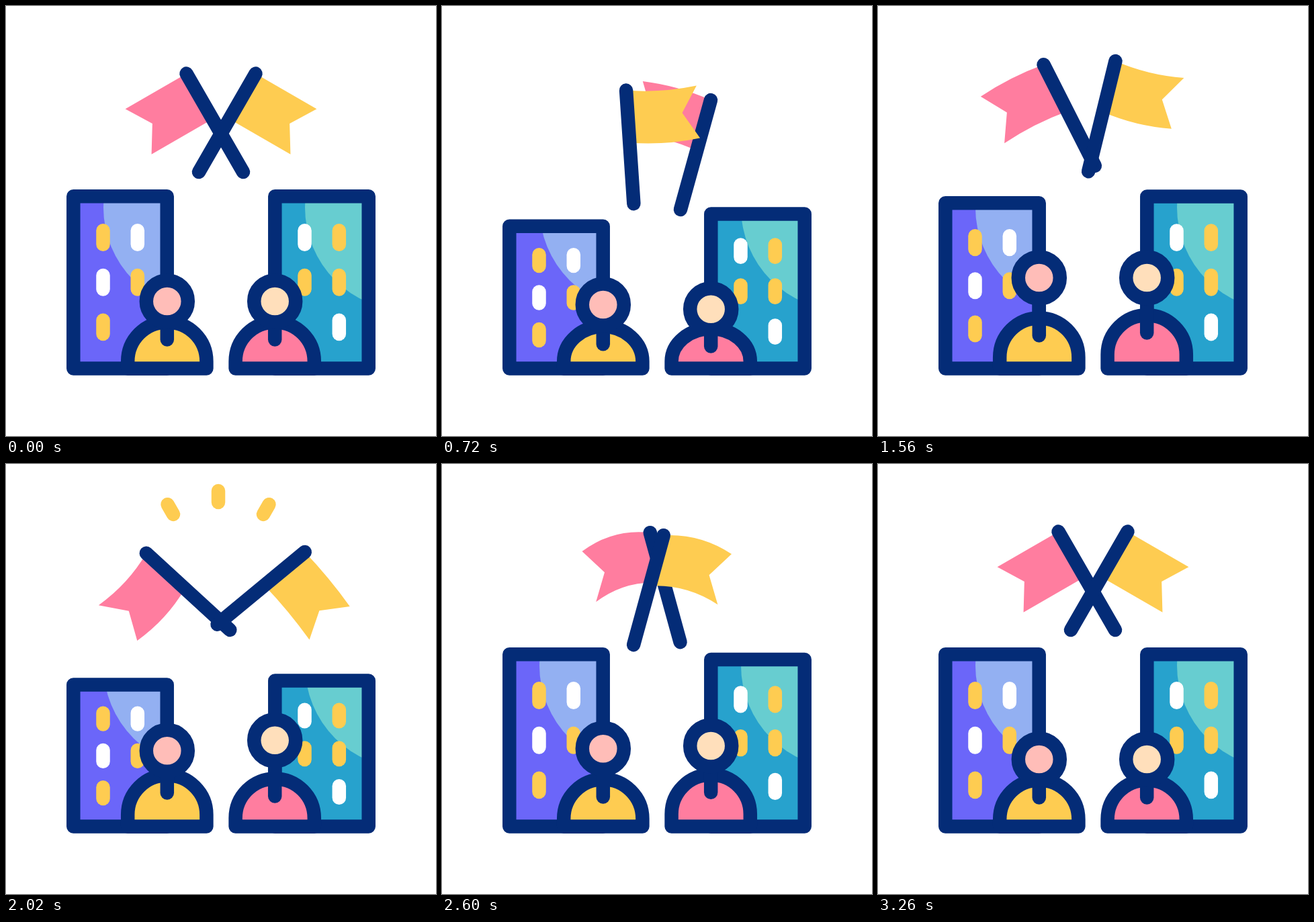
An HTML page with a canvas that plays this animation: 640 by 640 pixels, repeating every 3600 ms.

```html
<!DOCTYPE html>
<html lang="en">
<head>
<meta charset="utf-8">
<title>Flags between two offices</title>
<style>
  html, body { margin: 0; height: 100%; overflow: hidden; background: #fff; }
  canvas { display: block; width: 100vw; height: 100vh; }
</style>
</head>
<body>
<canvas id="stage" width="640" height="640"></canvas>
<script>
const ctx = document.getElementById('stage').getContext('2d');
const LOOP = 3600, BASE = 539.6, STROKE = 20.5;
const NAVY = '#042c77', YELLOW = '#fecc51', PINK = '#ff7d9f', WHITE = '#fff';

const clamp = v => Math.max(0, Math.min(1, v));
const swing = u => (1 - Math.cos(Math.PI * u)) / 2;
const snap = u => u * u * u * (u * (6 * u - 15) + 10);

// Eases from one extreme to the next
function track(t, times, values, ease = swing) {
  let v = values[0];
  for (let i = 1; i < times.length; i++) {
    const u = clamp((t - times[i - 1]) / (times[i] - times[i - 1]));
    v += (values[i] - values[i - 1]) * ease(u);
  }
  return v;
}

function line(x1, y1, x2, y2, color, width = STROKE) {
  ctx.strokeStyle = color;
  ctx.lineWidth = width;
  ctx.beginPath();
  ctx.moveTo(x1, y1);
  ctx.lineTo(x2, y2);
  ctx.stroke();
}

function outline() {
  ctx.strokeStyle = NAVY;
  ctx.lineWidth = STROKE;
  ctx.stroke();
}

function paint(fill) {
  ctx.fillStyle = fill;
  ctx.fill();
  outline();
}

// panes: two per row, y = yellow, w = white
function building(x, dark, light, panes, t) {
  const dip = 46 * swing(clamp(t / 2360) * 4);
  const top = 283.3 + dip, pivot = 546;
  const y = v => pivot - (pivot - v) * (1 - dip / (pivot - 283.3));
  const frame = new Path2D();
  frame.rect(x + 10.3, top, 139.4, BASE - top);
  ctx.save();
  ctx.clip(frame);
  ctx.fillStyle = dark;
  ctx.fill(frame);
  ctx.fillStyle = light;
  ctx.beginPath();
  ctx.arc(x + 208, 300, 153, 0, 7);
  ctx.fill();
  ctx.restore();
  [...panes].forEach((pane, i) => {
    if (pane === ' ') return;
    const px = x + 54.5 + 51.3 * (i % 2), py = 344.5 + 66.7 * (i >> 1);
    line(px, y(py - 10.2), px, y(py + 10.2), pane === 'y' ? YELLOW : WHITE);
  });
  ctx.strokeStyle = NAVY;
  ctx.lineWidth = STROKE;
  ctx.stroke(frame);
}

function person(x, shirt, skin, t) {
  const head = 439.5 + track(t, [100, 560, 1200, 1660, 2120, 2400, 3060], [0, 12, -35, -35, -10, -20, 0]);
  const body = track(t, [100, 540, 1240, 1840, 2200, 2700], [0, 10, -11, -2, -12, 0]);
  const shoulder = 529 + Math.min(body, 0);
  ctx.beginPath();
  ctx.moveTo(x - 58.6, BASE);
  ctx.lineTo(x - 58.6, shoulder);
  ctx.ellipse(x, shoulder, 58.6, 58.6 - Math.max(body, 0), 0, Math.PI, 2 * Math.PI);
  ctx.lineTo(x + 58.6, BASE);
  ctx.closePath();
  paint(shirt);
  line(x, head + 33, x, 496.6 + body, NAVY);
  ctx.beginPath();
  ctx.arc(x, head, 31, 0, 7);
  paint(skin);
}

function flag(color, t, mirrored) {
  const steps = [170, 830, 1740, 2400, 3000];
  const x = track(t, steps, [287, 285, 319, 285, 287], snap);
  const y = track(t, steps, [247, 305, 234, 270, 247], snap);
  const lean = track(t, [210, 970, 1900, 2540, 3140], [30, -30, 50.5, 15, 30]);
  const bend = 21 * Math.sin(6 * Math.PI * clamp((t - 245) / 2550));
  ctx.save();
  if (mirrored) {
    ctx.translate(640, 0);
    ctx.scale(-1, 1);
  }
  ctx.translate(x, y);
  ctx.rotate(lean * Math.PI / 180);
  ctx.fillStyle = color;
  ctx.beginPath();
  ctx.moveTo(0, -169);
  ctx.quadraticCurveTo(52, -169 + bend, 105, -169);
  ctx.lineTo(81, -130);
  ctx.lineTo(105, -91);
  ctx.quadraticCurveTo(52, -91 + bend, 0, -91);
  ctx.fill();
  line(0, 0, 0, -169, NAVY);
  ctx.restore();
}

// Sparks shoot outward, then their tails catch up
function sparks(t) {
  const width = STROKE * Math.min(clamp((t - 1800) / 80), clamp((2380 - t) / 80));
  if (!width) return;
  const front = -134 - 17 * clamp((t - 1800) / 200);
  const tail = -134 - 17 * clamp((t - 2160) / 200);
  for (const side of [-1, 0, 1]) {
    ctx.save();
    ctx.translate(316, 191);
    ctx.rotate(side * Math.PI / 6);
    line(0, tail, 0, front, YELLOW, width);
    ctx.restore();
  }
}

function draw(now) {
  const t = now % LOOP;
  ctx.fillStyle = WHITE;
  ctx.fillRect(0, 0, 640, 640);
  ctx.lineCap = ctx.lineJoin = 'round';
  building(90, '#6b66f9', '#93b0f2', 'ywwyy ', t - 200);
  building(390, '#27a2cd', '#67cdd0', 'wyyy w', t - 400);
  person(239.8, YELLOW, '#ffbdb8', t);
  person(400.2, PINK, '#ffdfbb', t - 200);
  flag(PINK, t, true);
  flag(YELLOW, t - 100, false);
  sparks(t);
  requestAnimationFrame(draw);
}
requestAnimationFrame(draw);
</script>
</body>
</html>
```
